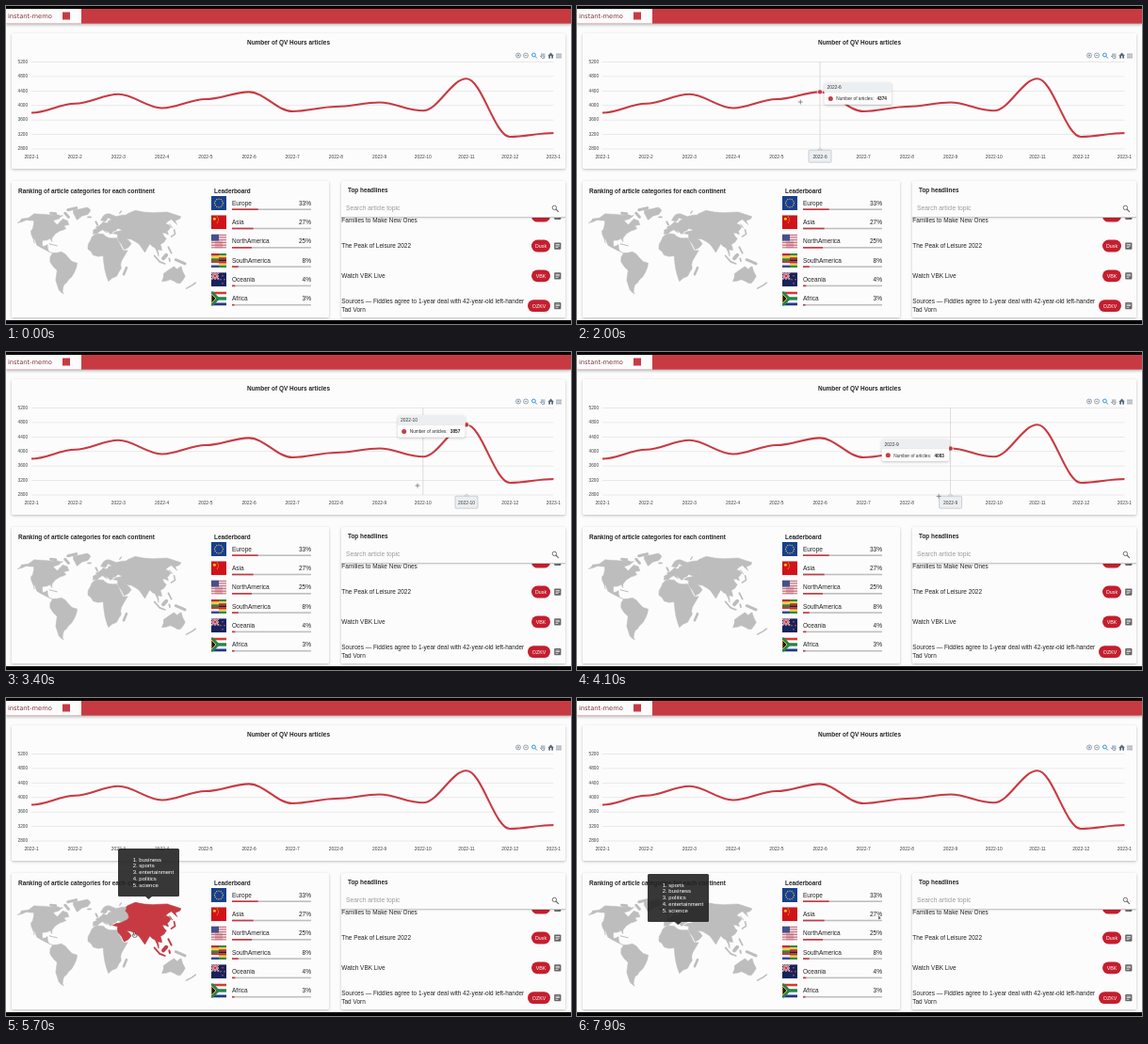
Recreate the animation shown at these times as an HTML page with a canvas. Size 600 by 338 pixels, loop 8 s.

```html
<!DOCTYPE html>
<html lang="en">
<head>
<meta charset="utf-8">
<title>News dashboard</title>
<style>
html, body { margin: 0; width: 100%; height: 100%; overflow: hidden; background: #fff; }
canvas { display: block; width: 600px; height: 338px; }
</style>
</head>
<body>
<canvas id="stage"></canvas>
<script>
const W = 600, H = 338, LOOP = 8000;
const canvas = document.getElementById('stage');
const g = canvas.getContext('2d');
const ratio = window.devicePixelRatio || 1;
canvas.width = W * ratio;
canvas.height = H * ratio;

const RED = '#c83a42', PILL = '#c41e2e', LAND = '#bdbdbd', INK = '#222', PAPER = '#fdfcfd';
const SANS = '"Liberation Sans", Arial, sans-serif';

const clamp = v => Math.max(0, Math.min(1, v));
const ramp = (t, a, b) => clamp((t - a) / (b - a));
const mix = (a, b, p) => a + (b - a) * p;

function seeded(seed) {
  return () => (seed = (seed * 16807) % 2147483647) / 2147483647;
}

function rect(x, y, w, h, fill) {
  g.fillStyle = fill;
  g.fillRect(x, y, w, h);
}

function paint(fill, stroke, width) {
  if (fill) { g.fillStyle = fill; g.fill(); }
  if (stroke) { g.strokeStyle = stroke; g.lineWidth = width; g.stroke(); }
}

function round(x, y, w, h, r, fill, stroke) {
  g.beginPath();
  g.roundRect(x, y, w, h, r);
  paint(fill, stroke, 0.6);
}

function disc(x, y, r, fill, stroke, width = 1) {
  g.beginPath();
  g.arc(x, y, r, 0, Math.PI * 2);
  paint(fill, stroke, width);
}

function line(points, color, width = 1) {
  g.beginPath();
  points.forEach(([x, y]) => g.lineTo(x, y));
  paint(null, color, width);
}

function shape(points, fill, stroke, width = 0.6) {
  g.beginPath();
  points.forEach(([x, y]) => g.lineTo(x, y));
  g.closePath();
  paint(fill, stroke, width);
}

function text(s, x, y, size, color = INK, align = 'left', weight = 400, family = SANS) {
  g.font = `${weight} ${size}px ${family}`;
  g.textAlign = align;
  g.fillStyle = color;
  g.fillText(s, x, y);
}

function shaded(alpha, drawIt) {
  g.save();
  g.shadowColor = `rgba(0,0,0,${alpha})`;
  g.shadowBlur = 3 * ratio;
  g.shadowOffsetY = ratio;
  drawIt();
  g.restore();
}

const card = (x, y, w, h) => shaded(0.25, () => round(x, y, w, h, 1.5, PAPER));

// ---- pointer: moment, x, y ----
const stops = [[800, 40, 120], [1300, 148, 94], [1750, 237, 102], [2000, 237, 102], [2800, 480, 118],
  [3240, 480, 140], [3360, 437, 142], [3500, 437, 142], [4100, 385, 153], [4350, 163, 234], [5400, 163, 234],
  [6000, 110.5, 268.5], [7700, 110.5, 268.5], [7900, 320, 231]];

function pointerAt(t) {
  const k = Math.max(0, stops.findLastIndex(s => t >= s[0]));
  const a = stops[k], b = stops[k + 1] || a;
  const p = ramp(t, a[0], b[0] + 0.01);
  return { x: mix(a[1], b[1], p), y: mix(a[2], b[2], p) };
}

const inChart = y => y < 156;

function pointer(t) {
  if (t < stops[0][0]) return;
  const { x, y } = pointerAt(t);
  if (inChart(y)) {
    line([[x - 2.5, y], [x + 2.5, y]], '#666', 0.7);
    line([[x, y - 2.5], [x, y + 2.5]], '#666', 0.7);
  } else if (x < 210) {
    round(x - 2, y - 0.8, 4.2, 3.8, 1.2, '#fff', '#222');
    round(x - 1, y - 3, 1.4, 4, 0.7, '#fff', '#222');
  } else {
    shape([[x, y], [x, y + 4.5], [x + 3, y + 3.3]], '#555', '#fff', 0.4);
  }
}

// ---- line chart ----
const counts = [3798, 4050, 4310, 3929, 4175, 4374, 3838, 3968, 4083, 3857, 4738, 3138, 3242];
const months = counts.map((_, i) => i < 12 ? `2022-${i + 1}` : '2023-1');
const STEP = 46.2, LAG = 120;
const px = i => 27 + i * STEP;
const py = v => 152 - (v - 2800) * 92.5 / 2400;

function toolbar() {
  const c = '#6e8192', y = 52.5;
  for (const x of [544, 552]) {
    disc(x, y, 2.5, null, c, 0.7);
    line([[x - 1.3, y], [x + 1.3, y]], c, 0.7);
  }
  line([[544, y - 1.3], [544, y + 1.3]], c, 0.7);
  disc(560.4, 52, 1.9, null, '#1e88e5', 0.9);
  line([[561.8, 53.4], [563.9, 55.5]], '#1e88e5', 1);
  for (let i = 0; i < 4; i++) line([[568.6 + i * 1.1, 50.4], [568.6 + i * 1.1, 54]], c, 0.6);
  line([[567, 52.8], [569.4, 55.4], [571.6, 55.4], [571.9, 53.5]], c, 0.8);
  shape([[575.3, 53], [578.6, 49.6], [581.9, 53]], '#5b6b79');
  rect(576.2, 53, 1.8, 2.6, '#5b6b79');
  rect(579.2, 53, 1.8, 2.6, '#5b6b79');
  for (let i = 0; i < 3; i++) rect(584, 50.7 + i * 1.9, 6, 0.8, c);
}

function chart() {
  card(6, 29, 588, 144);
  text('Number of QV Hours articles', 300, 40.8, 6.45, INK, 'center', 700);
  for (let v = 2800; v <= 5200; v += 400) {
    rect(27, py(v) - 0.4, 554.5, 0.8, '#e4e4e4');
    text(v, 23, py(v) + 1.2, 4.7, '#373d3f', 'right');
  }
  months.forEach((m, i) => text(m, px(i), 162.4, 4.9, '#373d3f', 'center'));
  toolbar();
}

function curve() {
  g.beginPath();
  g.moveTo(px(0), py(counts[0]));
  const reach = STEP * 0.35;
  for (let i = 1; i < counts.length; i++) {
    const a = py(counts[i - 1]), b = py(counts[i]);
    g.bezierCurveTo(px(i - 1) + reach, a, px(i) - reach, b, px(i), b);
  }
  paint(null, RED, 2.1);
}

// nearest month to where the pointer was a moment ago
const monthAt = t => Math.round((pointerAt(t - LAG).x - 27) / STEP);

function spot(i) {
  const x = px(i), y = py(counts[i]);
  return { x, y, boxX: x > 304 ? x - 73 : x + 4.6, boxY: y - 10 };
}

// labels glide: their place is the mean over the last moments
function hoverAt(t) {
  if (t < stops[0][0] + LAG || !inChart(pointerAt(t).y)) return null;
  const at = { x: 0, y: 0, boxX: 0, boxY: 0 }, n = 8;
  for (let i = 1; i <= n; i++) {
    const s = spot(monthAt(t - i * LAG / n));
    for (const key in at) at[key] += s[key] / n;
  }
  return { month: monthAt(t), at };
}

function chartTip({ month, at }) {
  disc(at.x, at.y, 2.7, RED, '#fff', 0.8);
  shape([[at.x - 2.5, 153.2], [at.x, 150.8], [at.x + 2.5, 153.2]], '#eceff1', '#a9b6bd');
  round(at.x - 12, 153.2, 24, 13, 1, '#eceff1', '#a9b6bd');
  text(months[month], at.x, 161.5, 4.9, '#373d3f', 'center');

  const { boxX: x, boxY: y } = at;
  shaded(0.22, () => round(x, y, 71.5, 23.5, 2, PAPER));
  round(x, y, 71.5, 10, [2, 2, 0, 0], '#eceff1');
  rect(x, y + 10, 71.5, 0.5, '#ddd');
  text(months[month], x + 3, y + 7, 4.9, '#333');
  disc(x + 6.7, y + 17.2, 2.5, RED);
  text('Number of articles:', x + 12.7, y + 19, 4.75, '#333');
  text(counts[month], x + 55.8, y + 19, 4.75, INK, 'left', 700);
}

// ---- world map: key points as longitude,latitude; strips are [points, width] ----
const world = {
  america: {
    coasts: [
      '-166,62 -157,71 -128,70 -95,69 -82,68 -94,59 -80,52 -76,62 -64,59 -57,52 -66,50 -60,46 -70,42 -81,31 -80,25 -84,30 -97,27 -95,18 -87,21 -83,10 -77,8 -92,14 -105,20 -113,31 -110,23 -117,33 -124,42 -125,49 -135,59 -152,60 -163,55',
      '-70,78 -35,83 -20,77 -24,70 -44,60 -53,67',
      '-77,8 -62,10 -50,1 -35,-7 -40,-20 -53,-33 -62,-40 -69,-51 -69,-55 -75,-48 -70,-18 -81,-5'
    ],
    strips: [['-82,72 -66,65', 3], ['-85,78 -68,82', 3], ['-118,72 -104,71', 3], ['-84,22 -70,19', 1]]
  },
  europe: {
    coasts: ['-9,43 -1,46 -4,48 8,54 11,57 20,55 23,59 30,60 22,64 15,57 6,59 14,68 28,71 42,66 68,69 62,52 49,42 38,46 28,41 23,37 13,45 17,39 9,44 -2,37 -9,37'],
    strips: [['-4,57 -1,52', 2], ['-22,65 -16,65', 1.8], ['55,72 64,76', 1.3]]
  },
  africa: {
    coasts: ['-6,36 10,37 20,31 33,31 43,12 51,12 40,-4 40,-15 33,-27 19,-35 12,-17 9,4 -8,5 -17,14 -13,27'],
    strips: [['49,-14 45,-24', 2.6]]
  },
  asia: {
    coasts: ['68,69 82,73 104,77 140,73 190,66 178,62 163,59 157,52 158,61 136,54 140,48 128,41 127,36 118,39 121,30 108,21 109,12 102,13 103,3 98,16 90,22 80,9 73,19 66,25 50,30 58,22 45,13 35,28 36,36 27,38 41,42 50,45 61,51 60,62'],
    strips: [['131,33 140,37 143,44', 1.6], ['142,47 143,53', 1], ['96,4 105,-5 114,-8', 1.7],
      ['111,0 116,5', 4], ['121,0 122,-4', 1.8], ['121,17 125,8', 1.8]]
  },
  oceania: {
    coasts: ['114,-23 130,-12 136,-16 142,-12 153,-27 150,-38 138,-35 129,-32 115,-35'],
    strips: [['132,-2 148,-8', 3], ['168,-46 174,-41 177,-37', 1.6]]
  }
};

// Robinson-like projection
function project(lon, lat) {
  const q = lat * lat;
  return [97.5 + lon * 0.627 * (1 - 4.2e-5 * q - 4e-9 * q * q), 268.3 - 0.71 * lat * (1 - 1.15e-5 * q)];
}
const outline = s => s.split(' ').map(p => project(...p.split(',').map(Number)));

// bends each stretch of coast a little to either side
function roughen(points, rand) {
  return points.flatMap(([x, y], i) => {
    const [u, v] = points[(i + 1) % points.length];
    const bend = (rand() - 0.5) * 0.25;
    return [[x, y], [(x + u) / 2 + (v - y) * bend, (y + v) / 2 - (u - x) * bend]];
  });
}

const rand = seeded(11);
const lands = Object.entries(world).map(([name, { coasts, strips }]) => ({
  name,
  coasts: coasts.map(s => roughen(outline(s), rand)),
  strips: strips.map(([s, width]) => [outline(s), width])
}));

function land({ coasts, strips }, color) {
  coasts.forEach(c => shape(c, color, color, 0.5));
  strips.forEach(([s, width]) => line(s, color, width));
}

function map(glow) {
  g.save();
  g.lineCap = g.lineJoin = 'round';
  for (const part of lands) {
    land(part, LAND);
    if (!glow[part.name]) continue;
    g.globalAlpha = glow[part.name];
    land(part, RED);
    g.globalAlpha = 1;
  }
  g.restore();
}

function mapTip(x, y, topics, alpha) {
  if (alpha <= 0) return;
  g.globalAlpha = alpha * 0.9;
  round(x, y, 65, 51, 1.5, INK);
  shape([[x + 29, y + 51], [x + 36, y + 51], [x + 32.5, y + 54]], INK);
  g.globalAlpha = alpha;
  topics.forEach((s, i) => text(`${i + 1}. ${s}`, x + 15.7, y + 13.5 + i * 6.8, 6, '#fff'));
  g.globalAlpha = 1;
}

// ---- leaderboard ----
function bands(colors, x = 0, y = 0, w = 16, h = 15) {
  colors.forEach((c, i) => rect(x, y + i * h / colors.length, w, h / colors.length + 0.1, c));
}

const flags = [
  () => {
    rect(0, 0, 16, 15, '#173f8f');
    for (let a = 0; a < 12; a++) disc(8 + 4.4 * Math.sin(a * Math.PI / 6), 7.5 + 4.4 * Math.cos(a * Math.PI / 6), 0.65, '#f2d13c');
  },
  () => {
    rect(0, 0, 16, 15, '#d0121b');
    disc(3.4, 4, 1.5, '#f5c518');
    for (let i = 0; i < 4; i++) disc(5.6 + 1.9 * Math.sin((i + 0.5) * Math.PI / 4), 1.8 + i * 2, 0.55, '#f5c518');
  },
  () => {
    bands(Array.from({ length: 11 }, (_, i) => i % 2 ? '#efe3e6' : '#c8717e'));
    rect(0, 0, 8, 7, '#45508e');
    rect(4, 7, 8, 8, 'rgba(190,90,110,.35)');
  },
  () => {
    bands(['#c52a32', '#f0cf3c', '#2e8540'], 0, 0, 8, 8);
    bands(['#2f8b45', '#f0cf3c', '#c52a32', '#222', '#c52a32', '#f0cf3c', '#2f8b45'], 8, 0, 8, 15);
    bands(['#d4333b', '#f4f4f4', '#2d4b99'], 0, 8, 8, 7);
  },
  () => {
    rect(0, 0, 16, 15, '#14245c');
    for (const [c, k] of [['#fff', 1.6], ['#c8202f', 0.8]]) {
      line([[0, 0], [8, 7.5]], c, k);
      line([[8, 0], [0, 7.5]], c, k);
      line([[4, 0], [4, 7.5]], c, k);
      line([[0, 3.75], [8, 3.75]], c, k);
    }
    for (let a = 0; a < 4; a++) disc(12 + 2 * Math.sin(a * Math.PI / 2), 7.5 - 4 * Math.cos(a * Math.PI / 2), 0.8, '#e35561');
  },
  () => {
    bands(['#d63a31', '#fff', '#23864d', '#fff', '#24358b']);
    line([[0, 0], [7, 7.5], [0, 15]], '#23864d', 3);
    line([[7, 7.5], [16, 7.5]], '#23864d', 3);
    shape([[0, 2.5], [5, 7.5], [0, 12.5]], '#151515', '#efb73e', 1);
  }
];
const ranks = [['Europe', 33], ['Asia', 27], ['NorthAmerica', 25], ['SouthAmerica', 8], ['Oceania', 4], ['Africa', 3]];

function leaderboard() {
  text('Leaderboard', 221, 198.6, 6.4, INK, 'left', 700);
  ranks.forEach(([name, share], i) => {
    const y = 202 + i * 20.3;
    g.save();
    g.translate(218, y);
    g.beginPath();
    g.rect(0, 0, 16, 15);
    g.clip();
    flags[i]();
    g.restore();
    text(name, 240, y + 9.6, 6.5);
    text(share + '%', 324, y + 9.6, 6.5, INK, 'right');
    rect(240, y + 13.4, 84, 1.6, '#bfbfbf');
    rect(240, y + 13.4, 84 * share / 100, 1.6, RED);
  });
}

// ---- headlines ----
const news = [
  ['Dusk', 'Families to Make New Ones'],
  ['Dusk', 'The Peak of Leisure 2022'],
  ['VBK', 'Watch VBK Live'],
  ['OZKV', 'Sources \u2014 Fiddles agree to 1-year deal with 42-year-old left-hander', 'Tad Vorn']
];

function headlines() {
  card(356, 186, 238, 145);
  text('Top headlines', 363, 198.4, 6.4, INK, 'left', 700);
  g.save();
  g.beginPath();
  g.rect(356, 225, 238, 106);
  g.clip();
  news.forEach(([label, first, second], i) => {
    const y = 223.2 + i * 31.8, w = label.length > 3 && second ? 24 : 20, mid = 578 - w / 2;
    const base = i === 0 ? y + 6.5 : second ? y - 2.6 : y + 2;
    text(first, 356.3, base, 6.45);
    if (second) text(second, 356.3, base + 9.2, 6.45);
    round(mid - w / 2, y - 6.4, w, 12.8, 6.4, PILL);
    text(label, mid, y + 1.9, 5.3, '#fff', 'center');
    round(582.2, y - 3.5, 7.2, 7.2, 0.8, '#666');
    for (let k = 0; k < 3; k++) rect(583.6, y - 1.9 + k * 1.6, k < 2 ? 4.4 : 2.8, 0.7, '#fff');
  });
  g.restore();
  rect(356, 224.2, 238, 0.8, '#bcbcbc');
  rect(356, 225, 238, 1.2, 'rgba(0,0,0,.08)');
  text('Search article topic', 361, 217.2, 6.75, '#9b9b9b');
  disc(582.4, 214.4, 2.2, null, '#666', 0.9);
  line([[584, 216], [586.8, 218.8]], '#666', 1.1);
}

function header() {
  shaded(0.3, () => rect(0, 3, W, 15.6, RED));
  rect(0, 3, 80, 15.6, PAPER);
  text('instant-memo', 2, 12.8, 6.7, '#7d3338', 'left', 400, '"DejaVu Sans", sans-serif');
  rect(60, 6.5, 8, 8, RED);
}

function draw(t) {
  g.setTransform(ratio, 0, 0, ratio, 0, 0);
  rect(0, 0, W, H, PAPER);
  header();
  chart();
  const hover = hoverAt(t);
  if (hover) line([[px(hover.month), 59], [px(hover.month), 152]], '#d4d4d4', 0.8);
  curve();
  if (hover) chartTip(hover);

  card(6, 186, 337, 145);
  text('Ranking of article categories for each continent', 13, 199, 6.42, INK, 'left', 700);
  map({
    asia: ramp(t, 4280, 4420) * (1 - ramp(t, 5750, 5900)),
    africa: ramp(t, 6150, 6250) * (1 - ramp(t, 7050, 7100))
  });
  leaderboard();
  headlines();
  mapTip(119, 160, ['business', 'sports', 'entertainment', 'politics', 'science'],
    t < 6200 ? ramp(t, 4350, 4640) : 0);
  mapTip(75, 187, ['sports', 'business', 'politics', 'entertainment', 'science'], ramp(t, 6180, 6450));
  pointer(t);
  rect(0, 0, W, 3, '#000');
  rect(0, 334, W, 4, '#000');
}

const begin = performance.now();
function tick(now) {
  draw(Math.max(0, now - begin) % LOOP);
  requestAnimationFrame(tick);
}
draw(0);
requestAnimationFrame(tick);
</script>
</body>
</html>
```
